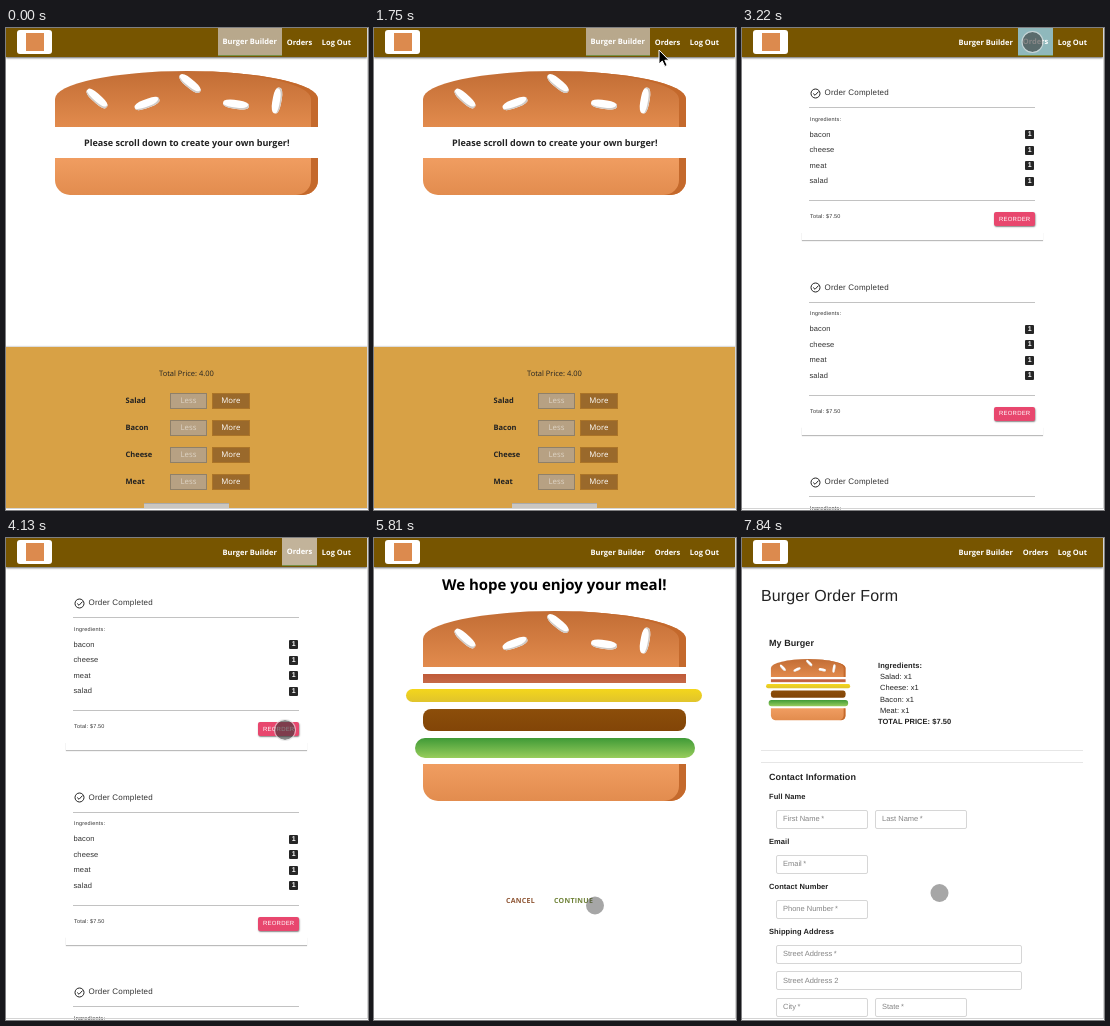
Write an HTML page that moves like this. It is 362 by 482 pixels and loops after 8000 ms.

```html
<!DOCTYPE html>
<html lang="en">
<head>
<meta charset="utf-8">
<title>Burger Builder</title>
<style>
html, body { margin: 0; width: 100%; height: 100%; overflow: hidden; background: #fff; }
body { position: relative; text-rendering: geometricPrecision; color: #222; }
div, span, svg { position: absolute; box-sizing: border-box; }
span { line-height: 20px; white-space: pre; }
#stage { width: 362px; height: 482px; overflow: hidden; }
.open { font-family: "Open Sans", sans-serif; }
.sans { font-family: "Liberation Sans", Arial, sans-serif; }
.bold { font-weight: 700; }
.white { color: #fff; }
.bunTop { background: linear-gradient(#c26d35, #e28b4d); border-radius: 50% 50% 0 0; box-shadow: inset -7px 0 #c4692c; }
.bunBottom { background: linear-gradient(#f09d61, #e28c4e); border-radius: 0 0 15px 15px; box-shadow: inset -7px 0 #c4692c; }
.seed { background: #fff; border-radius: 40%; box-shadow: inset -1px -1.5px #cfcac6; }
.bacon { background: linear-gradient(#bf5a38, #c66a47); }
.cheese { background: linear-gradient(#f4d61c, #e0c42c); border-radius: 10px; }
.meat { background: linear-gradient(#8c4e0a, #824507); border-radius: 8px; }
.salad { background: linear-gradient(#3f9a37, #98cd5c); border-radius: 10px; }
.less { background: #b7a183; border: .5px solid #8f8069; }
.more { background: #9a692b; border: .5px solid #ab7428; }
.rule { background: #c2c2c2; }
.card { box-shadow: 0 1px 1px #bbb; clip-path: inset(165px -1px -4px -1px); }
.one { background: #262626; border-radius: 1px; }
.reorder { background: #e8476e; border-radius: 2px; box-shadow: .5px 1px 1.5px #888; }
.field { border: 1px solid #d6d6d6; border-radius: 2px; }
.hint { color: #868686; }
.tab { border-bottom: 1.5px solid #74904a; }
.bar { background: #775500; box-shadow: 0 1px 2px #666; }
#dot { width: 20px; height: 20px; border-radius: 50%; background: rgba(70,70,70,.48); background-clip: padding-box; border: .5px solid transparent; }
#dot.down { width: 22px; height: 22px; margin: -1px; background-color: rgba(55,55,55,.6); border: 1.5px solid rgba(225,225,225,.7); }
</style>
</head>
<body>
<div id="stage"></div>
<script>
const stage = document.getElementById('stage');

function add(parent, tag, cls, css, text = '') {
  const el = document.createElement(tag);
  el.className = cls;
  el.style.cssText = css;
  el.textContent = text;
  return parent.appendChild(el);
}
const box = (p, x, y, w, h, cls, css = '') =>
  add(p, 'div', cls, `left:${x}px;top:${y}px;width:${w}px;height:${h}px;${css}`);
// y is the middle of the capital letters
const label = (p, x, y, size, text, cls, spacing = 0) =>
  add(p, 'span', cls, `left:${x}px;top:${y - 10}px;font-size:${size}px;letter-spacing:${spacing}px`, text);

function burger(p, y, bottom) {
  const g = box(p, 0, y, 362, 200, '');
  box(g, 49, 0, 263, 56, 'bunTop');
  [[91, 27, 42], [141, 32, -20], [184, 12, 40], [230, 33, 8], [271, 29, -80]].forEach(([cx, cy, turn]) =>
    box(g, cx - 13, cy - 4.5, 26, 9, 'seed', `transform:rotate(${turn}deg)`));
  box(g, 49, bottom, 263, 36.5, 'bunBottom');
  return g;
}
function fullBurger(p, y) {
  const g = burger(p, y, 153);
  box(g, 49, 63, 263, 9, 'bacon');
  box(g, 32, 78, 296, 13, 'cheese');
  box(g, 49, 97.5, 263, 22.5, 'meat');
  box(g, 40.5, 126.5, 280, 20, 'salad');
  return g;
}
const page = () => box(stage, 0, 0, 362, 482, '', 'background:#fff');

// Builder
const builder = page();
burger(builder, 43, 87);
label(builder, 78, 115, 9.05, 'Please scroll down to create your own burger!', 'open bold');
box(builder, 0, 319, 361, 161, '', 'background:#d8a145;box-shadow:0 -1px 1px #ddd');
label(builder, 153, 346, 7.5, 'Total Price: 4.00', 'open');
['Salad', 'Bacon', 'Cheese', 'Meat'].forEach((name, i) => {
  const y = 372.7 + i * 27.2;
  label(builder, 119.5, y, 7.5, name, 'open bold');
  box(builder, 163.5, y - 8, 37, 16, 'less');
  label(builder, 174.5, y, 7.8, 'Less', 'open').style.color = '#ddd3c4';
  box(builder, 206, y - 8, 38, 16, 'more');
  label(builder, 215.3, y, 7.8, 'More', 'open white');
});
box(builder, 138, 475, 84.5, 5, '', 'background:#cac6c0;border-top:.5px solid #aaa');

// Order list
const orders = page();
orders.style.color = '#333';
for (let i = 0; i < 3; i++) {
  const g = box(orders, 0, i * 194.7, 362, 215, '');
  box(g, 60, 40, 240.5, 172, 'card');
  const icon = box(g, 67.5, 59.5, 11, 11, '');
  icon.innerHTML = `<svg width="11" height="11" fill="none" stroke="#222">
    <circle cx="5.5" cy="5.5" r="4.5"/><path d="M3.2 5.5 5 7.3 8.6 3.5"/></svg>`;
  label(g, 82.5, 65, 8, 'Order Completed', 'sans', .2);
  box(g, 67, 79, 226, 1, 'rule');
  label(g, 68, 91.5, 5.5, 'Ingredients:', 'sans', .2);
  ['bacon', 'cheese', 'meat', 'salad'].forEach((name, j) => {
    const y = 106.5 + j * 15.5;
    label(g, 67.5, y, 7.5, name, 'sans', .12);
    box(g, 283.3, y - 4.5, 9, 9, 'one');
    label(g, 285.8, y + .6, 7, '1', 'sans bold white');
  });
  box(g, 67, 172, 226, 1, 'rule');
  label(g, 68, 189, 5.5, 'Total: $7.50', 'sans', .18);
  box(g, 252, 184, 41, 14, 'reorder');
  label(g, 257, 191.7, 6, 'REORDER', 'sans white', .2);
}

// Summary
const summary = page();
label(summary, 68, 46.8, 15, 'We hope you enjoy your meal!', 'open bold').style.color = '#000';
fullBurger(summary, 73);
label(summary, 132, 364.2, 7, 'CANCEL', 'open bold', .28).style.color = '#8e5533';
label(summary, 180, 364.2, 7, 'CONTINUE', 'open bold', .28).style.color = '#6f8238';

// Order form
const form = page();
label(form, 19, 58.6, 16, 'Burger Order Form', 'sans', .12);
label(form, 27, 104.5, 9, 'My Burger', 'sans bold', .05);
fullBurger(form, 0).style.cssText +=
  'left:14.7px;top:121px;transform-origin:0 0;transform:scale(.284,.322)';
label(form, 136, 127.5, 7.5, 'Ingredients:', 'sans bold', .1);
['Salad', 'Cheese', 'Bacon', 'Meat'].forEach((name, i) =>
  label(form, 138, 139 + i * 11.3, 7.5, name + ': x1', 'sans', .08));
label(form, 136, 184, 7.5, 'TOTAL PRICE: $7.50', 'sans bold', .04);
[212, 224].forEach(y => box(form, 19, y, 322, 1, '', 'background:#e6e6e6'));
label(form, 27, 239, 9, 'Contact Information', 'sans bold', .08);
[['Full Name', 258.5], ['Email', 303.5], ['Contact Number', 348.5], ['Shipping Address', 393.5]].forEach(([text, y]) =>
  label(form, 27, y, 7.5, text, 'sans bold', .07));
[
  ['First Name\u2009*', 34, 281, 92], ['Last Name\u2009*', 133, 281, 91.5],
  ['Email\u2009*', 34, 326, 92], ['Phone Number\u2009*', 34, 371, 92],
  ['Street Address\u2009*', 34, 416, 246], ['Street Address 2', 34, 442.5, 246],
  ['City\u2009*', 34, 469, 92], ['State\u2009*', 133, 469, 91.5]
].forEach(([text, x, y, w]) => {
  box(form, x, y - 9.5, w, 19, 'field');
  label(form, x + 7, y, 7.5, text, 'sans hint');
});

// Navigation bar and window edge
box(stage, 0, 0, 361, 28.5, 'bar');
box(stage, 11, 2, 35, 24, '', 'background:#fff;border-radius:3px');
box(stage, 19.5, 5, 18, 18, '', 'background:#dc8a4e');
const builderTab = box(stage, 211.5, 0, 64.5, 28, 'tab', 'background:#b8a88c');
const ordersTab = box(stage, 276, 0, 35, 28, 'tab');
const [builderLink, ordersLink] = [['Burger Builder', 216.5], ['Orders', 280.7], ['Log Out', 315.8]].map(([text, x]) =>
  label(stage, x, 14.7, 7.5, text, 'open bold white'));
box(stage, 0, 0, 362, 481, '', 'border:solid #d4d4d4;border-width:0 1px 1px 0');

// Pointer
const arrow = box(stage, 0, 0, 16, 22, '');
arrow.innerHTML = `<svg width="16" height="22"><path d="M1 1V15L4.3 12 6.8 17.5 9.2 16.4 6.8 11.2H11Z"
  fill="#000" stroke="#fff"/></svg>`;
const dot = box(stage, 0, 0, 20, 20, '');
dot.id = 'dot';
dot.style.width = dot.style.height = '';

const LOOP = 8000;
const path = [
  [840, 330, 260], [1610, 285, 21], [2100, 285, 21], [2450, 290.5, 14],
  [3570, 290.5, 14], [4060, 279, 192], [4340, 279, 192], [4700, 277, 194.5],
  [5250, 277, 194.5], [5740, 221, 367.5], [7490, 221, 367.5], [7840, 197.5, 355]
];
const presses = [[2940, 3430], [4060, 5200], [6090, 6440]];
const pages = [[builder, 0], [orders, 3080], [summary, 4410], [form, 6440]];

function pointAt(t) {
  const i = path.findIndex(k => k[0] > t);
  if (i < 0) return path[path.length - 1].slice(1);
  if (i === 0) return path[0].slice(1);
  const [a, b] = [path[i - 1], path[i]];
  const u = (t - a[0]) / (b[0] - a[0]);
  const e = u * u * (3 - 2 * u);
  return [1, 2].map(n => a[n] + (b[n] - a[n]) * e);
}
const show = (el, on) => { el.style.visibility = on ? 'visible' : 'hidden'; };

// the active link sits one pixel higher, above its underline
function setTab(tab, link, on) {
  show(tab, on);
  link.style.marginTop = on ? '-1px' : 0;
}

function draw(now) {
  const t = now % LOOP;
  pages.forEach(([el, from], i) => show(el, t >= from && t < (pages[i + 1]?.[1] ?? LOOP)));
  setTab(builderTab, builderLink, t < 3080);
  setTab(ordersTab, ordersLink, t >= 3080 && t < 4410);
  const u = Math.min(1, Math.max(0, (t - 3220) / 210));
  ordersTab.style.background = `rgb(${[[143, 194], [184, 179], [188, 154]].map(([a, b]) => a + (b - a) * u)})`;

  const [x, y] = pointAt(t);
  const touch = t >= 2450;
  show(arrow, t >= 840 && !touch);
  show(dot, touch);
  arrow.style.transform = `translate(${x - 1}px,${y}px)`;
  dot.style.transform = `translate(${x - 10}px,${y - 10}px)`;
  dot.className = presses.some(([a, b]) => t >= a && t < b) ? 'down' : '';
  requestAnimationFrame(draw);
}
requestAnimationFrame(draw);
</script>
</body>
</html>
```
